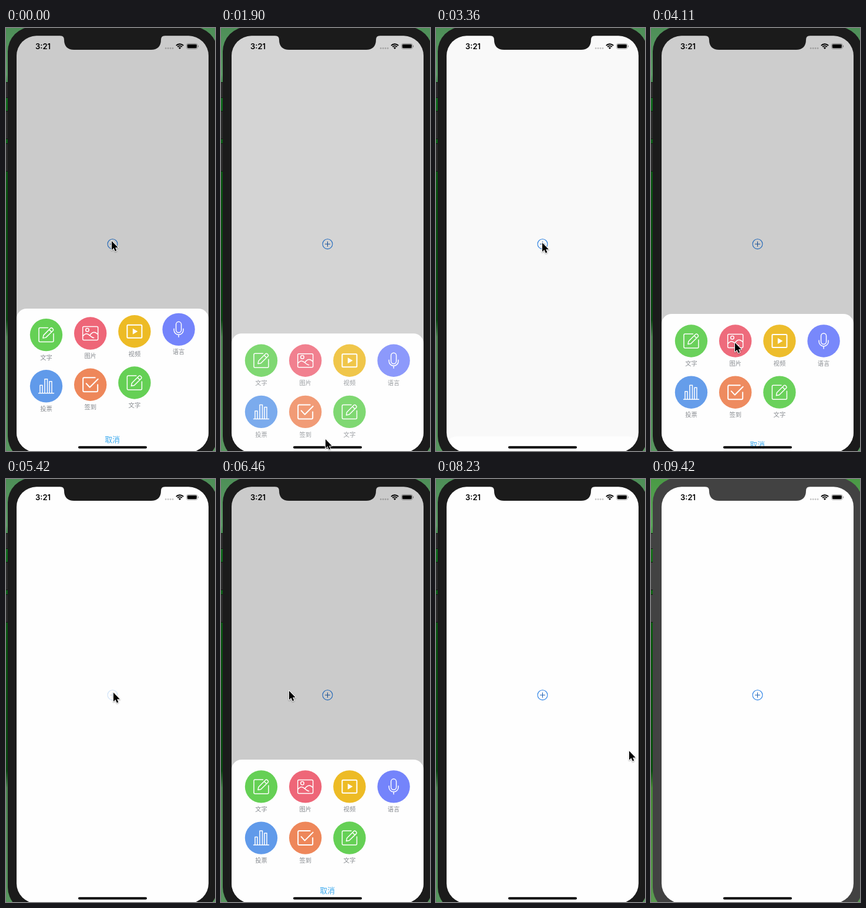
These frames come from a looping animation (356x719 px, 9.46 s). An HTML page with a canvas:

```html
<!DOCTYPE html>
<html lang="zh-CN">
<head>
<meta charset="utf-8">
<title>Action sheet</title>
<style>
  html, body { margin: 0; width: 100%; height: 100%; overflow: hidden; background: #1b1b1b; }
  canvas { display: block; }
</style>
</head>
<body>
<canvas id="stage" width="356" height="719"></canvas>
<script>
const W = 356, H = 719, LOOP = 9460, TICK = 146.7;
const canvas = document.getElementById('stage');
const main = canvas.getContext('2d');
const layer = document.createElement('canvas');
layer.width = W;
layer.height = H;
const sheet = layer.getContext('2d');

const CJK = '"Noto Sans CJK SC", "Noto Sans CJK JP", sans-serif';
const SHEET_TOP = 477, SHEET_H = 242, FADE = 290;
const FLASH_AT = 9420;

// Open and close time of the sheet, in ms
const visits = [[-365, 1830], [3170, 4074], [5640, 6602]];
// Ticks during which the plus button is held down
const presses = [[21, 21], [37, 38]];
// Pointer path: tick, x, y
const path = [
  [0, 180, 362], [1, 181, 364], [5, 179, 640], [6, 178, 730], [7, 176, 730],
  [8, 176, 712], [11, 178, 699], [14, 178, 699], [20, 181, 367], [21, 181, 365],
  [23, 181, 365], [27, 143, 535], [29, 143, 535], [36, 182, 371], [37, 183, 363],
  [40, 183, 363], [44, 116, 360], [45, 116, 360], [47, 118, 366], [50, 365, 450],
  [54, 365, 420], [55, 336, 428], [58, 309, 560], [60, 325, 690], [61, 365, 690]
];

const icons = {
  edit: 'M3 -12H-10.5Q-12.5 -12 -12.5 -10V10Q-12.5 12 -10.5 12H10.5Q12.5 12 12.5 10V-2' +
        'M-5.5 5.5L-4.5 0.5L7.5 -11.5Q9 -12.6 10.5 -11.2L11.6 -10Q12.8 -8.5 11.5 -7.2L-0.5 4.5ZM5 -9L9 -5',
  image: 'M-11 -11.5H11Q13 -11.5 13 -9.5V9.5Q13 11.5 11 11.5H-11Q-13 11.5 -13 9.5V-9.5Q-13 -11.5 -11 -11.5Z' +
         'M-2.4 -5.8A2.8 2.8 0 1 1 -8 -5.8A2.8 2.8 0 1 1 -2.4 -5.8' +
         'M-13 5C-8 -1 -5 0 -1 3.5S4 7.5 6 7.5M-1 3.5C3 -2.5 8 -4 13 2',
  video: 'M-11 -11H11Q12.5 -11 12.5 -9.5V9.5Q12.5 11 11 11H-11Q-12.5 11 -12.5 9.5V-9.5Q-12.5 -11 -11 -11Z',
  mic: 'M-4.5 -8.5A4.5 4.5 0 0 1 4.5 -8.5V1A4.5 4.5 0 0 1 -4.5 1Z' +
       'M-8 -1V1A8 8 0 0 0 8 1V-1M0 9V13',
  bars: 'M-13 12H13M-10.5 12V-1.5H-6.5V12M-2.5 12V-12H2V12M5.5 12V-8H9.5V12',
  check: 'M8 -12H-10.5Q-12.5 -12 -12.5 -10V10Q-12.5 12 -10.5 12H10.5Q12.5 12 12.5 10V0M-7 -2L-1 4.5L13 -9.5'
};
for (const name in icons) icons[name] = new Path2D(icons[name]);
const playMark = new Path2D('M-3 -5L5.5 0L-3 5Z');
const arrow = new Path2D('M0 0V15.3L3.5 12.1L5.9 17.4L8.4 16.3L6.1 11.2H10.9Z');
const notch = new Path2D('M92 12V13Q99 13 99 20C99 31 105 37 116 37H247C258 37 264 31 264 20Q264 13 271 13V12Z');

const items = [
  ['文字', '#65d055', 'edit'], ['图片', '#ee6678', 'image'],
  ['视频', '#edbb25', 'video'], ['语言', '#7484fb', 'mic'],
  ['投票', '#609aea', 'bars'], ['签到', '#ee875a', 'check'],
  ['文字', '#65d055', 'edit']
];

const clamp = v => Math.min(1, Math.max(0, v));
const ease = v => { v = clamp(v); return v * v * (3 - 2 * v); };

function box(g, x, y, w, h, r, color) {
  g.beginPath();
  g.roundRect(x, y, w, h, r);
  g.fillStyle = color;
  g.fill();
}

function disc(g, x, y, r, color) {
  g.beginPath();
  g.arc(x, y, r, 0, Math.PI * 2);
  g.fillStyle = color;
  g.fill();
}

function label(g, text, x, y, size, color) {
  g.font = `${size}px ${CJK}`;
  g.textAlign = 'center';
  g.textBaseline = 'alphabetic';
  g.fillStyle = color;
  g.fillText(text, x, y + size * 0.37);
}

function drawPhone(g, flash) {
  const tones = flash
    ? ['#4a9a45', '#5ba85a', '#146f18', '#06550b', '#064d0c', '#478a36', '#5a9a50']
    : ['#4d8f57', '#5f9c68', '#0f6a1c', '#08500f', '#07450f', '#4b8350', '#58965f'];
  const stops = [0, 0.11, 0.17, 0.4, 0.69, 0.73, 1];
  const fill = g.createLinearGradient(0, 0, 0, H);
  stops.forEach((s, i) => fill.addColorStop(s, tones[i]));
  g.fillStyle = fill;
  g.fillRect(0, 0, W, H);
  for (const [y, h] of [[92, 27], [141, 48], [196, 48]]) {
    g.fillStyle = '#101510';
    g.fillRect(0, y, 5, h);
    g.fillStyle = flash ? '#424242' : '#2b2b2b';
    g.fillRect(0, y + 1, 5, h - 2);
  }
  box(g, 3, -2, 357, 738, 42, flash ? '#424242' : '#1b1b1b');
}

function drawStatus(g) {
  g.fillStyle = '#000';
  g.font = '600 13px Inter, sans-serif';
  g.textAlign = 'left';
  g.textBaseline = 'alphabetic';
  g.fillText('3:21', 50, 36);
  for (let i = 0; i < 4; i++) disc(g, 272.2 + i * 3.95, 34.5, 1.4, '#c6c6c6');

  g.strokeStyle = '#000';
  g.lineWidth = 1.9;
  g.lineCap = 'butt';
  for (const r of [5.2, 8.4]) {
    g.beginPath();
    g.arc(296, 35.6, r, -Math.PI * 0.76, -Math.PI * 0.24);
    g.stroke();
  }
  g.beginPath();
  g.moveTo(296, 36);
  g.arc(296, 35.6, 3, -Math.PI * 0.76, -Math.PI * 0.24);
  g.fillStyle = '#000';
  g.fill();

  g.beginPath();
  g.roundRect(307.5, 26.5, 18.6, 9, 2.6);
  g.strokeStyle = '#a4a4a4';
  g.lineWidth = 0.9;
  g.stroke();
  box(g, 308.8, 27.8, 16, 6.4, 1.4, '#000');
  box(g, 326.8, 29.4, 1.2, 3.2, 0.6, '#999');
}

function drawPlus(g, held) {
  g.globalAlpha = held ? 0.22 : 1;
  g.strokeStyle = '#2b82e6';
  g.lineWidth = 1.1;
  g.beginPath();
  g.arc(181.5, 367.2, 8.4, 0, Math.PI * 2);
  g.stroke();
  g.strokeStyle = '#1f62b4';
  g.beginPath();
  g.moveTo(177, 367.3);
  g.lineTo(186, 367.3);
  g.moveTo(181.5, 362.8);
  g.lineTo(181.5, 371.8);
  g.stroke();
  g.globalAlpha = 1;
}

function drawItem(g, [text, color, icon], x, y) {
  disc(g, x, y, 27.7, color);
  label(g, text, x, y + 38.3, 10.3, '#85898e');
  g.save();
  g.translate(x, y);
  g.strokeStyle = '#fff';
  g.lineWidth = icon === 'video' || icon === 'check' ? 2 : 1.5;
  g.lineJoin = g.lineCap = 'round';
  g.stroke(icons[icon]);
  if (icon === 'video') {
    g.fillStyle = '#fff';
    g.fill(playMark);
  }
  g.restore();
}

// Damped bounce of one column, age in seconds
function bounce(age) {
  age = Math.max(0, age);
  return 105 * Math.exp(-8.8 * age) * Math.cos(12 * age);
}

function drawSheet(g, time) {
  const visit = visits.find(([open, close]) => time > open && time < close + FADE);
  if (!visit) return;
  const [open, close] = visit;
  const shown = ease((time - open) / FADE) * (1 - ease((time - close) / FADE));
  const s = sheet;
  s.clearRect(0, 0, W, H);
  s.fillStyle = 'rgba(0,0,0,0.2)';
  s.fillRect(0, 0, W, H);
  s.save();
  s.translate(0, SHEET_H * (1 - shown));
  box(s, 18, SHEET_TOP, 327, SHEET_H + 30, 17, '#fefefe');
  label(s, '取消', 181.3, 699, 12.7, '#38a8ee');
  items.forEach((item, i) => {
    const col = i % 4, row = i >> 2;
    const lift = bounce((time - open) / 1000 - col * 0.035);
    drawItem(s, item, 68.5 + col * 75.2, 523 + row * 87.2 + lift);
  });
  s.restore();
  g.globalAlpha = shown;
  g.drawImage(layer, 0, 0);
  g.globalAlpha = 1;
}

function pointerAt(tick) {
  const i = path.findIndex(p => p[0] > tick);
  if (i < 0) return path[path.length - 1].slice(1);
  const [n0, x0, y0] = path[i - 1], [n1, x1, y1] = path[i];
  const k = ease((tick - n0) / (n1 - n0));
  return [x0 + (x1 - x0) * k, y0 + (y1 - y0) * k];
}

function drawPointer(g, tick) {
  const [x, y] = pointerAt(tick);
  g.save();
  g.translate(x, y);
  g.shadowColor = 'rgba(0,0,0,0.35)';
  g.shadowBlur = 2;
  g.shadowOffsetY = 1;
  g.strokeStyle = '#fff';
  g.lineWidth = 2;
  g.lineJoin = 'round';
  g.stroke(arrow);
  g.shadowColor = 'transparent';
  g.fillStyle = '#000';
  g.fill(arrow);
  g.restore();
}

function draw(t) {
  const g = main, flash = t >= FLASH_AT;
  // The picture advances in even steps
  const tick = Math.floor((t + 16) / 146.9);
  drawPhone(g, flash);
  g.save();
  g.beginPath();
  g.roundRect(18, 13.3, 327, 708, 34);
  g.clip();
  g.fillStyle = '#fefefe';
  g.fillRect(0, 0, W, H);
  drawStatus(g);
  drawPlus(g, presses.some(([a, b]) => tick >= a && tick <= b));
  drawSheet(g, tick * TICK);
  box(g, 123, 710.8, 117, 4, 2, '#000');
  drawPointer(g, tick);
  g.restore();
  g.fillStyle = flash ? '#424242' : '#1b1b1b';
  g.fill(notch);
}

const start = performance.now();
function frame() {
  draw((performance.now() - start) % LOOP);
  requestAnimationFrame(frame);
}
frame();
</script>
</body>
</html>
```
